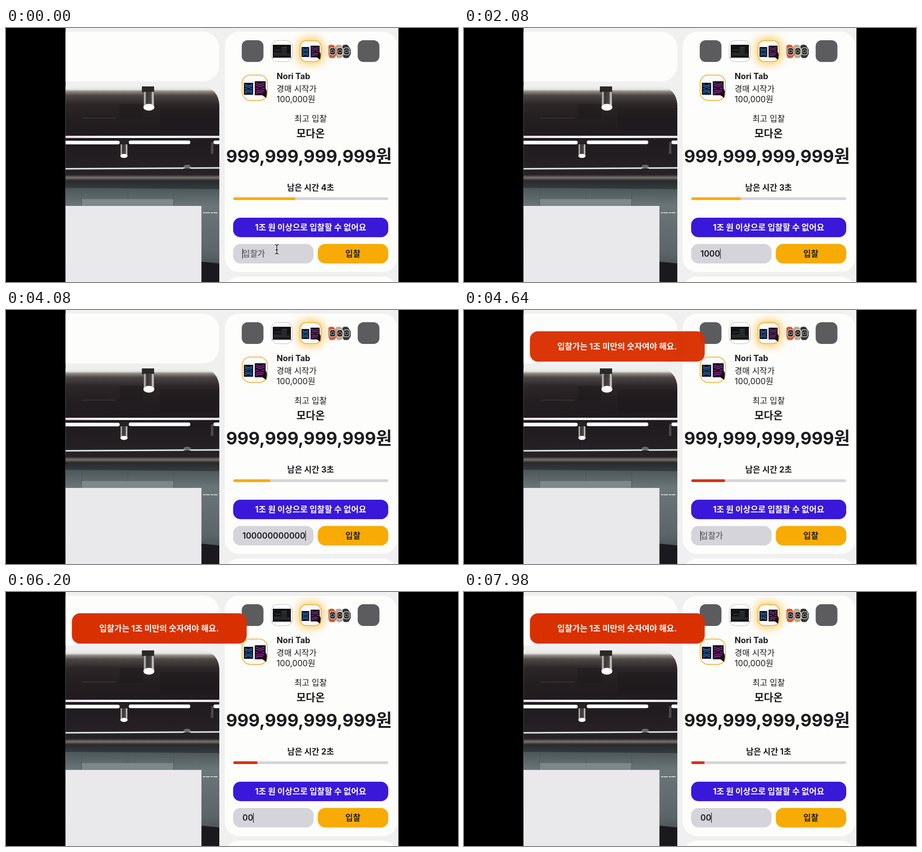
An HTML page that plays this animation: 998x561 px, repeating every 8000 ms.

```html
<!DOCTYPE html>
<html lang="ko">
<head>
<meta charset="utf-8">
<title>경매</title>
<style>
  html, body { margin: 0; width: 100%; height: 100%; overflow: hidden; background: #000; }
  svg { display: block; width: 998px; height: 561px; }
  text { font: 400 18.1px Inter, 'Noto Sans CJK KR', 'Noto Sans CJK', sans-serif; fill: #1c1c20; white-space: pre; }
  .semi { font-weight: 600; }
  .bold { font-weight: 700; }
  .mid { text-anchor: middle; }
  .light { fill: #fff; }
</style>
</head>
<body>
<svg viewBox="0 0 998 561">
  <defs>
    <clipPath id="page"><rect x="131.500" width="735" height="561"/></clipPath>
    <clipPath id="camera"><path d="M131 129H435A36 42 0 0 1 471 171V561H131Z"/></clipPath>
    <clipPath id="square"><rect width="48" height="48" rx="14"/></clipPath>
    <filter id="glow" x="-80%" y="-80%" width="260%" height="260%"><feGaussianBlur stdDeviation="10"/></filter>
    <filter id="soft" x="-10%" y="-100%" width="120%" height="300%"><feGaussianBlur stdDeviation="2"/></filter>
    <linearGradient id="ceiling" x2="0" y2="1">
      <stop offset="0" stop-color="#f0f0ee"/><stop offset=".03" stop-color="#e4e4df"/>
      <stop offset=".05" stop-color="#8f8b86"/><stop offset=".09" stop-color="#4c4645"/>
      <stop offset=".18" stop-color="#2c2628"/><stop offset=".32" stop-color="#231e20"/>
      <stop offset=".55" stop-color="#1f1b1e"/><stop offset="1" stop-color="#292527"/>
    </linearGradient>
    <linearGradient id="wall" x2="0" y2="1">
      <stop offset="0" stop-color="#2b2f31"/><stop offset=".08" stop-color="#4e585b"/>
      <stop offset=".25" stop-color="#6b7678"/><stop offset=".7" stop-color="#5c6567"/><stop offset="1" stop-color="#3c4143"/>
    </linearGradient>
    <linearGradient id="beam" x2="0" y2="1">
      <stop offset="0" stop-color="#242022"/><stop offset=".45" stop-color="#77716e"/><stop offset="1" stop-color="#211f21"/>
    </linearGradient>
    <linearGradient id="metal">
      <stop offset="0" stop-color="#4d4848"/><stop offset=".12" stop-color="#cfccc9"/><stop offset=".28" stop-color="#3a3637"/>
      <stop offset=".7" stop-color="#4a4646"/><stop offset=".87" stop-color="#e2dfdc"/><stop offset="1" stop-color="#4a4646"/>
    </linearGradient>
    <linearGradient id="rail">
      <stop offset="0" stop-color="#f1dce6"/><stop offset=".4" stop-color="#fff"/><stop offset="1" stop-color="#e6e2ea"/>
    </linearGradient>
    <g id="tablets">
      <rect x="4" y="15" width="17" height="22" rx="1" fill="#0b1020"/>
      <g fill="none" stroke="#2f83d2" stroke-width="1.300">
        <path d="M6 18q6.500 5 13 0M6 21q6.500 5 13 0M6 31q6.500-5 13 0M6 34q6.500-5 13 0"/>
        <path d="M6 26h4m5 0h4"/>
      </g>
      <rect x="24" y="12" width="20" height="26" rx="1" fill="#180a20"/>
      <g fill="none" stroke="#b52fae" stroke-width="1.300">
        <path d="M26 15q8 6 16 0M26 19q8 5 16 0M26 31q8-5 16 0M26 35q8-6 16 0"/>
        <path d="M26 25h5m6 0h5"/>
      </g>
      <path d="M44 26q3 3 2 9l-1 8-7-5q-2-5 4-8Z" fill="#141013"/>
    </g>
    <g id="watch">
      <path d="M0 3q5-4 12-1l6 9v11l-4 7q-6 3-12 0L0 22Z"/>
      <rect x="2" y="7" width="14" height="17" rx="5" fill="#dfdcd6"/>
      <rect x="3.500" y="8.500" width="11" height="14" rx="4" fill="#191a1d"/>
      <circle cx="9" cy="15.500" r="3.500" fill="none" stroke="#e9e8e4"/>
    </g>
    <path id="ibeam" d="M594 478.500q4 0 4 3V496q0 3-4 3M602 478.500q-4 0-4 3V496q0 3 4 3M595.500 490h5"/>
  </defs>

  <rect width="998" height="561"/>
  <g clip-path="url(#page)">
    <rect x="131" width="736" height="561" fill="#f0f0f0"/>
    <g fill="#fdfdfb">
      <rect x="60" y="8" width="411" height="110" rx="36"/>
      <rect x="483" y="8" width="381" height="531" rx="32"/>
      <rect x="483" y="549" width="381" height="80" rx="32"/>
    </g>

    <g clip-path="url(#camera)">
      <rect x="131" y="129" width="340" height="220" fill="url(#ceiling)"/>
      <path d="M168 199h75" stroke="#4c4547"/>
      <path d="M251 168h52v32h-52zM340 176h131v50H340z" fill="#1b1719" opacity=".4"/>
      <path d="M131 254H250M272 254H407M458 254h20" stroke="#b5b0b1" stroke-width="11" opacity=".6" filter="url(#soft)"/>
      <rect x="131" y="238" width="340" height="5" fill="url(#rail)"/>
      <g stroke="#fff" stroke-width="8" stroke-linecap="round"><path d="M126 253H247M275 252.500H403M462 252.500h20"/></g>

      <path d="M300 129h27v13h-27z" fill="#2c2829"/>
      <rect x="303.500" y="141" width="24" height="35" fill="url(#metal)"/>
      <ellipse cx="315.500" cy="175" rx="12" ry="7.500" fill="#fffefa"/>
      <path d="M251 247h18v12h-18z" fill="#282426"/>
      <rect x="252.500" y="257" width="16" height="25" fill="url(#metal)"/>
      <ellipse cx="260.500" cy="282.500" rx="8" ry="4.500" fill="#fffefa"/>
      <path d="M453 252h5v26h-6z" fill="#4c4748"/>

      <path d="M131 311L471 309" stroke="#8e9a9c" stroke-width="4.500" opacity=".5"/>
      <path d="M131 311L471 309" stroke="#f0f8f8" stroke-width="2.500"/>
      <ellipse cx="400" cy="306" rx="8" ry="4" fill="#69686a"/>
      <path d="M392 311h16" stroke="#222" stroke-width="2"/>
      <rect x="131" y="324" width="340" height="14" fill="url(#beam)"/>
      <rect x="131" y="337" width="340" height="224" fill="url(#wall)"/>
      <path d="M131 337H471V356L131 353Z" fill="#25282a" opacity=".6"/>
      <path d="M167 378H370V393H167Z" fill="#7d8889"/>
      <path d="M167 357V393M269 357V378M370 357V393" stroke="#4c5558"/>
      <path d="M435 408h32" stroke="#d3d9d8" stroke-width="2" stroke-dasharray="5 1 9 2"/>
      <path d="M431 516L471 520V561H431Z" fill="#1a1a1e"/>
      <rect x="131" y="393" width="300.500" height="168" fill="#e9e9ec"/>
    </g>

    <rect x="520.500" y="27" width="48" height="48" rx="13" fill="#5c5c5f"/>
    <rect x="776.500" y="27" width="48" height="48" rx="13" fill="#5c5c5f"/>
    <g transform="translate(585 27)">
      <rect x=".5" y=".5" width="47" height="47" rx="14" fill="#fff" stroke="#b9b9bd"/>
      <rect x="4" y="10" width="40" height="28" fill="#111214"/>
      <path d="M6 27h17V15H35V29H42V34H6Z" fill="#26282a"/>
      <path d="M9 22H22M26 16h9" stroke="#505356"/>
      <path d="M2 38h44v1.500H2z" fill="#96979b"/>
    </g>
    <rect x="645" y="23" width="56" height="56" rx="18" fill="#f9ab00" opacity=".62" filter="url(#glow)"/>
    <g transform="translate(648.500 27)">
      <rect x=".8" y=".8" width="46.400" height="46.400" rx="14" fill="#fafafa" stroke="#f3b02d" stroke-width="1.700"/>
      <use href="#tablets" clip-path="url(#square)"/>
    </g>
    <g transform="translate(712 27)">
      <rect width="49" height="48" rx="13" fill="#fff"/>
      <use href="#watch" x="31" y="9" fill="#34363b"/>
      <use href="#watch" x="16" y="9" fill="#b9aa91"/>
      <use href="#watch" x="0" y="9" fill="#df552b"/>
      <path d="M1 40h4m4 0h4m8 0h3m11 0h6" stroke="#ccc"/>
    </g>
    <g transform="translate(520.500 103) scale(1.2)">
      <rect x=".7" y=".7" width="46.700" height="46.700" rx="15" fill="#fafafa" stroke="#f3b02d" stroke-width="1.400"/>
      <use href="#tablets" clip-path="url(#square)"/>
    </g>

    <text x="597.500" y="113" class="bold">Nori Tab</text>
    <text x="597.500" y="141">경매 시작가</text>
    <text x="597.500" y="164">100,000원</text>
    <text x="672.500" y="206.500" class="mid">최고 입찰</text>
    <text x="672.500" y="240.500" class="mid bold" style="font-size:22.600px">모다온</text>
    <text x="486" y="297" class="bold" style="font-size:38.200px">999,999,999,999원</text>
    <text x="672.500" y="358.500" class="mid bold" id="remaining"></text>

    <rect x="502" y="374" width="342" height="6" rx="3" fill="#d4d4da"/>
    <rect x="502" y="374" height="6" rx="3" id="bar"/>

    <rect x="501.500" y="419" width="342.500" height="43" rx="16" fill="#3a18d9"/>
    <text x="672.500" y="447" class="mid bold light">1조 원 이상으로 입찰할 수 없어요</text>
    <rect x="501.500" y="477" width="177.500" height="43" rx="16" fill="#d4d4da"/>
    <text x="522" y="504.500" class="semi" id="field"></text>
    <path d="M0 487.500v22" stroke="#1c1c20" stroke-width="1.300" id="caret"/>
    <rect x="688.500" y="477" width="155.500" height="43" rx="16" fill="#f8ab04"/>
    <text x="766" y="504.500" class="mid bold">입찰</text>

    <g id="pointer" fill="none" stroke-linecap="round">
      <use href="#ibeam" stroke="#fff" stroke-width="3.600"/>
      <use href="#ibeam" stroke="#111" stroke-width="1.600"/>
    </g>

    <g id="toast">
      <rect x="145.500" y="47" width="386" height="67" rx="18" fill="#d93000"/>
      <text x="338" y="86.500" class="mid bold light">입찰가는 1조 미만의 숫자여야 해요.</text>
    </g>
  </g>
</svg>
<script>
const LOOP = 8000;
const TICKS = [1700, 4230, 6770];    // countdown drops by one
const TYPE_START = 1300, KEY = 250, MAX_KEYS = 12;
const REJECTED = 4350;
const EXTRA_KEYS = [4700, 5000];
const BLINK = 1265;

const el = id => document.getElementById(id);
const [remaining, bar, field, caret, pointer, toast] =
  ['remaining', 'bar', 'field', 'caret', 'pointer', 'toast'].map(el);
const show = (node, on) => node.setAttribute('visibility', on ? 'visible' : 'hidden');
const passed = (times, t) => times.filter(x => t >= x).length;

function typedText(t) {
  if (t < TYPE_START) return '';
  if (t >= REJECTED) return '0'.repeat(passed(EXTRA_KEYS, t));
  const count = Math.min(MAX_KEYS, 1 + Math.floor((t - TYPE_START) / KEY));
  return '1' + '0'.repeat(count - 1);
}

function caretOn(t) {
  if (t < TYPE_START) return t < 500;
  const lastKey = EXTRA_KEYS[1];
  return t < lastKey || Math.floor((t - lastKey) / BLINK) % 2 === 0;
}

function draw(now) {
  const t = now % LOOP;
  remaining.textContent = `남은 시간 ${4 - passed(TICKS, t)}초`;
  bar.setAttribute('width', 137 - 0.0135 * t);
  bar.setAttribute('fill', t < TICKS[1] ? '#f8ab04' : '#d93000');

  const typed = typedText(t);
  field.textContent = typed || '입찰가';
  field.style.fill = typed ? '' : '#75757b';
  const width = typed ? field.getComputedTextLength() : 0;
  caret.setAttribute('transform', `translate(${522.5 + width} 0)`);
  show(caret, caretOn(t));

  show(pointer, t < 700);
  toast.setAttribute('opacity', Math.max(0, Math.min(1, (t - REJECTED) / 300)));
  requestAnimationFrame(() => draw(performance.now()));
}
draw(0);
</script>
</body>
</html>
```
